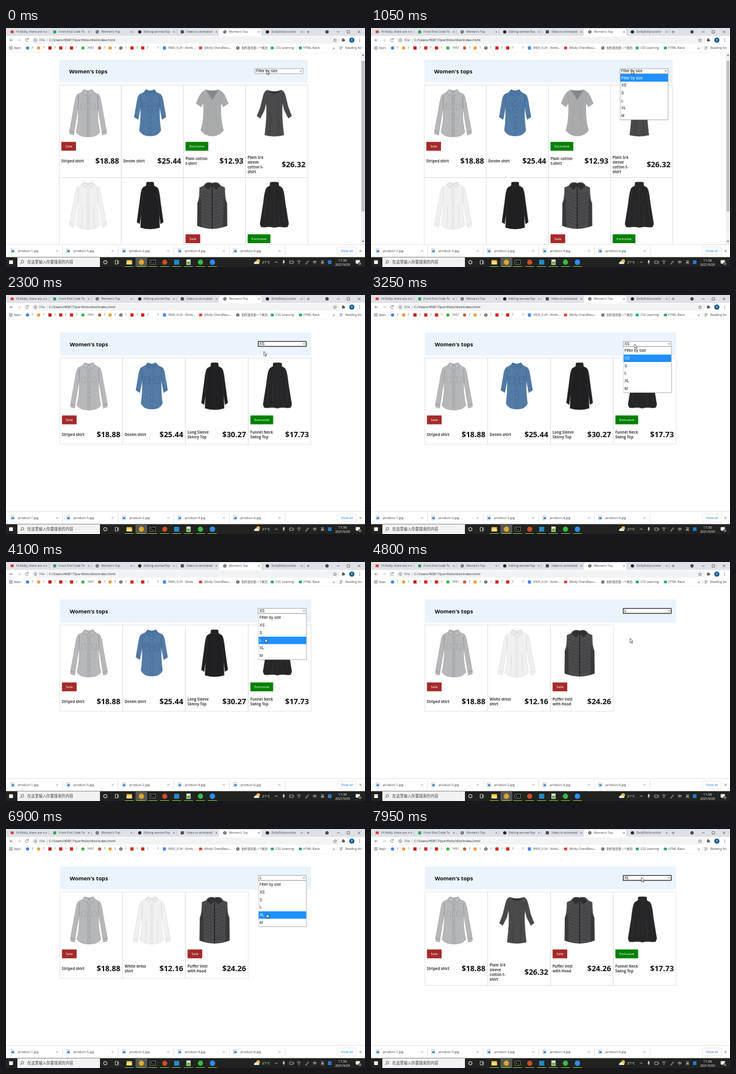
These frames come from a looping animation (600 px wide and 400 px high, 8000 ms). An HTML page:

```html
<!DOCTYPE html>
<html lang="en">
<head>
<meta charset="utf-8">
<title>Women's tops</title>
<style>
html, body { margin: 0; width: 100%; height: 100%; overflow: hidden; background: #fff; }
#stage { display: block; width: 600px; height: 400px; font-family: "Open Sans", "Noto Sans", "Noto Sans CJK SC", sans-serif; }
.form { font-family: "Liberation Sans", Arial, sans-serif; }
.bold { font-weight: 700; }
.view, .menu, .ring, .cursor { animation: 8s step-end infinite; }
.view, .menu, .ring { opacity: 0; }
.all { animation-name: all; }
.xs { animation-name: xs; }
.l { animation-name: l; }
.xl { animation-name: xl; }
.ring { animation-name: ring; }
.menu { --row: 0; animation-name: menu, pick; }
.pick { transform: translateY(calc(var(--row) * 12.7px)); }
.unpick { transform: translateY(calc(var(--row) * -12.7px)); }
.cursor { animation-name: cursor; }

@keyframes all { 0% { opacity: 1 } 28.75%, 100% { opacity: 0 } }
@keyframes xs { 0% { opacity: 0 } 28.75% { opacity: 1 } 60%, 100% { opacity: 0 } }
@keyframes l { 0% { opacity: 0 } 60% { opacity: 1 } 91.875%, 100% { opacity: 0 } }
@keyframes xl { 0% { opacity: 0 } 91.875%, 100% { opacity: 1 } }
@keyframes ring {
  0% { opacity: 0 } 28.75% { opacity: 1 } 40.625% { opacity: 0 }
  60% { opacity: 1 } 70.625% { opacity: 0 } 91.875%, 100% { opacity: 1 }
}
@keyframes menu {
  0% { opacity: 0; transform: none }
  10% { opacity: 1; transform: none }
  28.75% { opacity: 0; transform: translate(5.5px, 9.7px) }
  40.625% { opacity: 1; transform: translate(5.5px, 9.7px) }
  60% { opacity: 0; transform: translate(5.5px, 9.7px) }
  70.625% { opacity: 1; transform: translate(5.5px, 9.7px) }
  91.875%, 100% { opacity: 0; transform: translate(5.5px, 9.7px) }
}
@keyframes pick {
  0% { --row: 0 } 23.125% { --row: 1 } 49.375% { --row: 2 } 50.625% { --row: 3 }
  77.5% { --row: 2 } 80.625% { --row: 3 } 82.5%, 100% { --row: 4 }
}
@keyframes cursor {
  0% { transform: translate(435.5px, 70.5px) }
  19.375% { transform: translate(433px, 78px) }
  23.125% { transform: translate(431px, 94.5px) }
  33.75% { transform: translate(432.5px, 92px) }
  35% { transform: translate(436px, 88px) }
  36.25% { transform: translate(440px, 83px) }
  36.875% { transform: translate(440.5px, 82px) }
  47.5% { transform: translate(437px, 100px) }
  49.375% { transform: translate(436px, 112px) }
  50% { transform: translate(435px, 120px) }
  50.625% { transform: translate(434px, 126px) }
  51.25% { transform: translate(433px, 128px) }
  63.125% { transform: translate(439px, 94px) }
  65.625% { transform: translate(442px, 84px) }
  77.5% { transform: translate(438px, 115px) }
  80% { transform: translate(437px, 120px) }
  80.625% { transform: translate(436.5px, 126px) }
  81.25% { transform: translate(436px, 132px) }
  82.5% { transform: translate(435.5px, 139px) }
  83.125% { transform: translate(435.5px, 142px) }
  95.625% { transform: translate(447px, 100px) }
  97.5% { transform: translate(449px, 93px) }
  98.75% { transform: translate(451px, 85px) }
  99.375%, 100% { transform: translate(452px, 81px) }
}
</style>
</head>
<body>
<svg id="stage" viewBox="0 0 600 400"></svg>
<script>
const text = (x, y, s, size = 5.1, fill = '#444', more = '') =>
  `<text x="${x}" y="${y}" font-size="${size}" fill="${fill}" ${more}>${s}</text>`;
const rect = (x, y, w, h, fill, more = '') =>
  `<rect x="${x}" y="${y}" width="${w}" height="${h}" fill="${fill}" ${more}/>`;
const dot = (x, y, r, fill, more = '') => `<circle cx="${x}" cy="${y}" r="${r}" fill="${fill}" ${more}/>`;
const shape = (d, fill) => `<path d="${d}" fill="${fill}"/>`;
const line = (d, color = '#555', w = .7) =>
  `<path d="${d}" fill="none" stroke="${color}" stroke-width="${w}"/>`;
const cross = (x, y, r, color) => line(`M${x - r} ${y - r}l${2 * r} ${2 * r}m0 ${-2 * r}l${-2 * r} ${2 * r}`, color);
const globe = (x, y) => dot(x, y, 2.7, '#555b61') + line(`M${x - 1.5} ${y - 1}l1.6 .4l-.6 1.6m1 .4l1.4 -1`, '#fff', .7);
const middle = 'text-anchor="middle"';

// Garments: a right half, mirrored, plus details around x = 0.
const both = s => s + `<g transform="scale(-1 1)">${s}</g>`;
const garment = (id, fill, edge, half, detail) =>
  `<g id="${id}">` + both(shape(half, fill) + line(half.replace(/Z$/, ''), edge, .4)) + detail + '</g>';
const buttons = (color, from, to) => {
  let s = '';
  for (let y = from; y < to; y += 9) s += dot(.2, y, .5, color);
  return s;
};
const collar = (fill, edge) => both(`<path d="M0 4L7 0L10 5L5 10Z" fill="${fill}" stroke="${edge}" stroke-width=".5"/>`);
const quilt = [...Array(10)].map((_, i) => `M0 ${22 + i * 5.6}L17 ${16 + i * 5.6}`).join('');
const shirtHalf = 'M-.3 2L7 0L10 4L18 8C21 12 22 20 24 32L31 70L30.5 74L24 76L19.5 48L16.5 30C15.5 45 17 58 20 71C15 78 8 79 -.3 79Z';

const defs = `<defs>
<pattern id="stripe" width="1.7" height="4" patternUnits="userSpaceOnUse">${rect(0, 0, 1.7, 4, '#c6c7c9')}${rect(0, 0, .7, 4, '#a0a2a5')}</pattern>
<clipPath id="page">${rect(0, 41, 600, 321, '#000')}</clipPath>` +
  garment('shirt', 'url(#stripe)', '#808286', shirtHalf,
    both(line('M16 10L16.5 30M23.5 71L30.5 69', '#7b7d81', .6) + line('M5 24h7v9h-7z', '#8d8f93', .4)) +
    collar('#bcbdc0', '#75777b') + line('M1.6 9V79M-1.6 9V79', '#85878b', .5) + buttons('#777', 14, 76)) +
  garment('denim', '#527ba5', '#3c648e',
    'M-.3 2L7 0L10 4L18 8C22 13 22 21 24 31L26.5 46L20 50L16 29C15.5 43 16 55 18 68C14 76 8 77.5 -.3 77.5Z',
    both(line('M16 10L16 29M19 46L25.8 42.500', '#365d86', .7) + line('M4 23h9v3l-4.500 2l-4.500 -2zM4 25v10h9v-10', '#3f6791', .6)) +
    collar('#4b769f', '#345a82') + line('M1.5 9V77M-1.5 9V77', '#3d658e', .6) + buttons('#c7d3de', 14, 72)) +
  garment('tee', '#a9aaab', '#959697',
    'M-.3 16L10 0L14 2C20 5 23 14 27 23L18.500 29L15 22C13.500 38 15 54 19 68C13 76 6 77.500 -.3 77.500Z',
    shape('M-10 0Q0 5 10 0L0 17Z', '#87888a') + shape('M-9.500 0Q0 6 9.500 0Q0 3 -9.500 0Z', '#77787a') +
    both(line('M10.500 0L0 17', '#8d8e90', 1) + line('M15 22L14 8M7 30Q6 52 9 72', '#999', .5))) +
  garment('dress', '#49494b', '#3a3a3c',
    'M-.3 7Q8 7 11.500 .500L15 2.500C19 7 20 18 23.500 30L29 44L23.500 48L16.500 34L13.800 22C12 40 14 58 16 76Q8 78 -.3 78Z',
    shape('M-11.500 .500Q0 5 11.500 .500Q8 7 0 7Q-8 7 -11.500 .500Z', '#303032') +
    both(line('M13.800 22L12.500 8M6 45Q8 60 7 76', '#3a3a3c', .6))) +
  garment('white', '#f0f0f1', '#cbccce', shirtHalf,
    both(line('M16 10L16.500 30M23.500 71L30.500 69', '#c8c9cb', .6) + line('M10 40Q8 60 11 76', '#dfdfe1', 1)) +
    collar('#eaeaec', '#bfc0c2') + line('M1.600 9V79M-1.600 9V79', '#cecfd1', .5) + buttons('#c0c0c2', 14, 76)) +
  garment('skivvy', '#202022', '#1a1a1b',
    'M-.3 0Q4 -.500 6 .500L6.500 6L12 9C15 12 16 22 17.500 34L22 67L17.500 70L15 52L16 76Q8 78.500 -.3 78.500Z',
    line('M-6.500 5Q0 8 6.500 5', '#39393b', .6) + both(line('M15 52L13 28L12 14', '#37373a', .6))) +
  garment('vest', '#4b4b4e', '#303032',
    'M-.3 2C6 -1 12 1 14 6L21 9C21.500 18 21 26 24.500 35L25 73Q12 78 -.3 78Z',
    both(shape('M19 20Q19 30 24.500 35V73L18 75.500Z', '#39393c') + line(quilt, '#38383b', .7)) +
    shape('M-13 7Q-9 0 0 2Q9 0 13 7L6 13L0 6L-6 13Z', '#303032') + line('M0 6V78', '#1c1c1e', 1.2)) +
  garment('funnel', '#262628', '#1c1c1e',
    'M-.3 0Q4 -.500 7 .500L7.500 6L12.500 9C16 13 17 24 18.500 36L24 70L22 75L17 75.500Q8 74 -.3 76Z',
    line('M-7.500 6Q0 9 7.500 6', '#3c3c3e', .6) + both(line('M17 66L14 26L13 14M7 35Q6 56 9 74', '#39393b', .6))) +
  '</defs>';

const products = [
  ['shirt', 'Striped shirt', '18.88', 'Sale'],
  ['denim', 'Denim shirt', '25.44'],
  ['tee', 'Plain cotton|t-shirt', '12.93', 'Exclusive'],
  ['dress', 'Plain 3/4|sleeve|cotton t-|shirt', '26.32'],
  ['white', 'White dress|shirt', '12.16'],
  ['skivvy', 'Long Sleeve|Skivvy Top', '30.27'],
  ['vest', 'Puffer Vest|with Hood', '24.26', 'Sale'],
  ['funnel', 'Funnel Neck|Swing Top', '17.73', 'Exclusive']
];

function card([id, name, price, badge], x, y, w, h) {
  const lines = name.split('|');
  const drop = w > 104 ? .6 : -.8;
  const mid = y + drop + (lines.length > 2 ? 133.5 : 128);
  let s = rect(x, y, w, h, '#fff', 'stroke="#d6d7d9" stroke-width=".7"');
  s += `<use href="#${id}" x="${x + w * .463}" y="${y + 8 + drop / 2}"/>`;
  if (badge) {
    const bw = badge === 'Sale' ? 24.5 : 38;
    s += rect(x + 3.5, y + drop + 95.8, bw, 14.8, badge === 'Sale' ? '#a52a2a' : '#008000') +
      text(x + 3.5 + bw / 2, y + drop + 105.4, badge, 6, '#fff', middle);
  }
  lines.forEach((part, i) => {
    s += text(x + 3.3, mid + 2.2 + (i - (lines.length - 1) / 2) * 8, part, 6.1, '#3c3f43', 'class="bold"');
  });
  return s + text(x + w * .964, mid + 4.6, '$' + price, 12.7, '#111', 'class="bold" text-anchor="end"');
}

function view(cls, value, items, rowHeight) {
  const scrolled = cls === 'all';
  const [x, y, w] = scrolled ? [89, 53, 415.2] : [90, 62.6, 420];
  const cw = w / 4, sx = scrolled ? 416 : 421.5, sy = scrolled ? 68 : 77.8;
  let s = rect(0, 41, 600, 321, '#fff') + rect(x, y, w, 38.6, '#ebf4fd') +
    text(x + 16.5, y + 23, "Women's tops", 9.2, '#0c0c0c', 'class="bold"');
  items.forEach((n, i) => {
    s += card(products[n], x + (i % 4) * cw, y + 42.6 + Math.floor(i / 4) * rowHeight, cw, rowHeight);
  });
  s += rect(sx, sy, 80.3, 8.2, '#fff', 'stroke="#777" stroke-width=".6"') +
    text(sx + 2, sy + 6.4, value, 6.4, '#111', 'class="form"') +
    line(`M${sx + 75} ${sy + 3.2}l1.5 1.6l1.5 -1.6`, '#222', .8);
  if (scrolled) s += rect(593, 41, 7, 321, '#f1f1f1') + rect(594, 55, 5.5, 252, '#c1c1c1') +
    shape('M594.8 46.5l1.900 -2.400l1.900 2.400zM594.800 356l1.900 2.400l1.900 -2.400z', '#666');
  return `<g class="view ${cls}">${s}</g>`;
}

function menu() {
  const labels = fill => ['Filter by size', 'XS', 'S', 'L', 'XL', 'M']
    .map((s, i) => text(418.3, 85.6 + i * 12.7, s, 6.4, fill)).join('');
  return `<g class="menu form">` + rect(417, 77.5, 80.3, 77, '#000', 'opacity=".12"') +
    rect(416.4, 76.8, 80.2, 76.8, '#fff', 'stroke="#999" stroke-width=".6"') + labels('#111') +
    `<g class="pick"><svg x="416.7" y="77.1" width="79.6" height="12.7" viewBox="416.7 77.1 79.6 12.7">` +
    rect(416, 77, 81, 13, '#1e90ff') + `<g class="unpick">${labels('#fff')}</g></svg></g></g>`;
}

function browser() {
  let s = rect(0, 0, 600, 41, '#fff') + rect(0, 0, 600, 13.3, '#dee1e6') +
    shape('M353 13.4Q356 13.4 356 10.5V4Q356 1.5 358.5 1.5H424Q426.5 1.5 426.5 4V10.5Q426.5 13.4 429.5 13.4Z', '#fff');
  ['Hi Molly, there are n', 'Front End Code To', "Women's Top", 'Editing womenTop', 'Video to animated', "Women's Top", 'DollyDollyrunsfar']
    .forEach((title, i) => {
      const x = i * 71.1 + 10.3;
      s += [rect(x - 2.6, 4.2, 5.2, 4.4, '#d93f35'), rect(x - 2.5, 4, 5, 5, '#3c9f5b'), globe(x, 6.5), dot(x, 6.5, 2.8, '#24292e'),
        rect(x - 2.6, 3.8, 5.2, 5.2, '#4b4b4b'), globe(x, 6.5), dot(x, 6.5, 2.8, '#24292e')][i];
      s += text(x + 6.7, 8.4, title, 5.1, '#45494d') + cross(x + 57, 6.5, 1.3, '#555');
      if (i !== 4 && i !== 5) s += line(`M${x + 61.3} 3.5v6`, '#9da1a6', .5);
    });
  s += line('M502.5 6.5h5m-2.5 -2.5v5') + dot(536.5, 6.5, 2.7, '#333') + line('M535.3 6l1.2 1.2l1.2 -1.2', '#fff', .6) +
    line('M553 6.5h4.5M570 4.3h4.3v4.3h-4.3z', '#333', .6) + cross(590, 6.5, 2, '#333');

  s += line('M11.5 20.3h-5m2.2 -2.2l-2.2 2.2l2.2 2.2') + line('M19.5 20.3h5m-2.2 -2.2l2.2 2.2l-2.2 2.2', '#b4b7ba') +
    line('M37 18.7A2.4 2.4 0 1 0 37.4 21M37.4 17v2h-2') + rect(43, 14.6, 516, 11.6, '#f1f3f4', 'rx="5.8"') +
    dot(49.2, 20.3, 2.3, 'none', 'stroke="#555" stroke-width=".6"') + line('M49.2 19.9v1.6m0 -2.7v.5') +
    text(56, 22.3, 'File', 5.6, '#555') + line('M69 17.8v5', '#aaa', .5) +
    text(72, 22.3, 'C:/Users/40817/portfolio/dist/index.html', 5.85, '#222') +
    line('M549.8 17.6l.8 1.8l2 .2l-1.5 1.3l.5 2l-1.8 -1.1l-1.8 1.1l.5 -2l-1.5 -1.3l2 -.2z', '#555', .6) +
    rect(561.5, 18.4, 4.2, 4.2, '#555', 'rx=".6"') + dot(563.4, 18.1, 1, '#555') + dot(566, 20.4, 1, '#555') +
    dot(578, 20.3, 4.3, '#0b5a94') + text(578, 22.1, 'R', 5, '#fff', middle) +
    [18.2, 20.3, 22.4].map(y => dot(591, y, .6, '#555')).join('');

  for (let i = 0; i < 9; i++) s += rect(5.6 + i % 3 * 2, 30.7 + Math.floor(i / 3) * 2, 1.4, 1.4, ['#d9483b', '#3d7fe0', '#45a05a'][i % 3]);
  s += text(13, 35.4, 'Apps');
  const marks = [[36, '#3f82e8'], [54.5, '#f29a2e'], [73.5, '#b5231f'], [91.5, '#d7261e'], [109.5, '#d7261e'],
    [128.5, '#42b54a'], [156.5, '#c65a4a'], [174, '#ef9a33'], [192, ''], [210.5, '#d7261e'], [228.5, '#d7261e']];
  marks.forEach(([x, color], i) => {
    const square = [2, 3, 4, 9, 10].includes(i);
    s += !color ? globe(x, 33.4) : square ? rect(x - 2.7, 30.7, 5.4, 5.4, color) : dot(x, 33.4, 2.7, color);
    s += text(x + 7.2, 35.4, i === 5 ? '745?' : '?');
  });
  s += text(253, 35.4, '?') + rect(262.3, 30.7, 5, 5.5, '#4285f4') + text(271, 35.4, '9900_9.24 - Nimb...') +
    rect(322.6, 31.2, 5.2, 4.4, '#d93f35') + text(331.5, 35.4, '(Molly Chen)Resu...') + globe(387.5, 33.4) +
    text(394, 35.4, '制作我的第一个网页', 4.8) + rect(442.5, 31.3, 5, 4.2, '#1ba866') + text(450.5, 35.4, 'CSS Learning') +
    rect(489.5, 31.3, 5, 4.2, '#1ba866') + text(497, 35.4, 'HTML Basis') + text(546, 35.6, '»', 6.5) +
    line('M557.5 31.5h5m-5 2h5m-5 2h3') + text(567, 35.4, 'Reading list') + line('M554 30v7', '#ccc', .5) +
    line('M0 41h600', '#e3e4e6', .5);
  return s;
}

function downloads() {
  let s = rect(0, 362, 600, 21.5, '#fff') + line('M0 362.3h600', '#cfd1d4', .6);
  [1, 5, 2, 4, 6].forEach((n, i) => {
    const x = i * 93;
    s += rect(x + 8.6, 369.6, 5, 6.6, '#e8eef5', 'stroke="#8997a5" stroke-width=".4"') + rect(x + 9.5, 372, 3.8, 3, '#2f82cb') +
      text(x + 20, 375.2, `product-${n}.jpg`, 5.5, '#3a3d40') + line(`M${x + 83.5} 374l1.7 -1.7l1.7 1.7`) +
      line(`M${x + 94.5} 365v16`, '#d2d4d7', .6);
  });
  return s + rect(554, 366.5, 31.5, 13.3, '#fff', 'rx="1.5" stroke="#d5d8dc" stroke-width=".6"') +
    text(569.8, 375.2, 'Show all', 5.2, '#1a73e8', middle) + cross(592.5, 373.2, 1.7, '#555');
}

function taskbar() {
  const y = 392;
  let s = rect(0, 383.5, 600, 16.5, '#20231f') + rect(5.3, 388.8, 6.2, 6.2, '#fff') + rect(19, 384, 138, 16, '#f2f2f2') +
    dot(27.5, 391.2, 2.2, 'none', 'stroke="#333" stroke-width=".7"') + line('M25.9 392.9l-2 2.1', '#333') +
    text(35.6, 394.4, '在这里输入你要搜索的内容', 6.4, '#444') +
    dot(166, y, 2.9, 'none', 'stroke="#fff" stroke-width=".9"') + line('M182.5 389h4v6h-4zM188 389v6', '#fff', .7) +
    rect(216.5, 383.5, 19.5, 16.5, '#555852') +
    rect(201.5, 388.5, 9, 7, '#f5c84c') + rect(201.5, 391.5, 9, 4, '#ffe08a') + dot(226.3, y, 4.4, '#e1a42f') +
    rect(240.8, 388.3, 9, 7.4, '#0b0b0b', 'stroke="#aaa" stroke-width=".6"') + line('M242.5 390.5l1.5 1.3l-1.5 1.3m2.5 0h2', '#fff', .6) +
    dot(265.3, y, 4.3, '#d24a2c') + rect(281, 388, 8.5, 8, '#2489ca') + rect(301.5, 387.5, 7, 9, '#dfe9d5') +
    rect(302.5, 391, 5, 4.5, '#66a948') + dot(325, y, 4.4, '#37b944') + dot(345, y, 4.5, '#2d8cff');
  [206, 226, 245, 265, 285, 305, 325, 345].forEach(x => { s += rect(x - 7.5, 398.9, 15, 1.1, '#7fba3a'); });
  s += dot(421.5, 390, 3, '#f6b73c') + shape('M415 395a2 2 0 0 1 1 -3.4a2.7 2.7 0 0 1 5 .4a1.6 1.6 0 0 1 1.6 3z', '#dfe6ec') +
    text(428, 394, '21°C', 6, '#fff') + line('M449.5 393l2.2 -2.2l2.2 2.2', '#fff') +
    rect(463, 388.5, 2.4, 4.5, '#ddd', 'rx="1.2"') + line('M462 392q2.2 3.5 4.4 0m-2.2 1.8v2', '#ddd', .6) +
    line('M474 390h6v4h-6zM481 391.3v1.5', '#ddd') +
    line('M486.5 390.5q3 -2.6 6 0M487.7 392.2q1.8 -1.6 3.6 0', '#ddd') + dot(489.5, 394, .8, '#ddd') +
    line('M500.5 395l4.5 -5.5l1 1l-4.5 5z', '#ddd', .6) + text(516, 394.2, '中', 6, '#fff', middle) +
    text(529, 394.2, '英', 6, '#fff', middle) + rect(538, 388.8, 6, 6.2, '#2876d4') +
    text(562.5, 390.5, '11:36', 5.6, '#fff', middle) + text(562.5, 397.6, '2021/9/29', 5.2, '#fff', middle) +
    shape('M584.5 388.5h7v5.5h-3.5l-1.5 1.7v-1.7h-2z', '#fff') + dot(591.5, 394.5, 2.7, '#454842') +
    text(591.5, 396.1, '25', 3.6, '#fff', middle);
  return s;
}

document.getElementById('stage').innerHTML = defs + `<g clip-path="url(#page)">` +
  view('all', 'Filter by size', [0, 1, 2, 3, 4, 5, 6, 7], 154.7) +
  view('xs', 'XS', [0, 1, 5, 7], 144.7) + view('l', 'L', [0, 4, 6], 144.7) + view('xl', 'XL', [0, 3, 6, 7], 156.5) +
  `</g>` + browser() + downloads() + taskbar() +
  `<rect class="ring" x="421.5" y="77.8" width="80.3" height="8.2" rx=".6" fill="none" stroke="#101010" stroke-width="1.1"/>` +
  menu() +
  `<path class="cursor" d="M0 0V7L1.7 5.5L2.8 8.2L4 7.7L2.9 5.1H5.1Z" fill="#fff" stroke="#111" stroke-width=".6"/>`;
</script>
</body>
</html>
```
